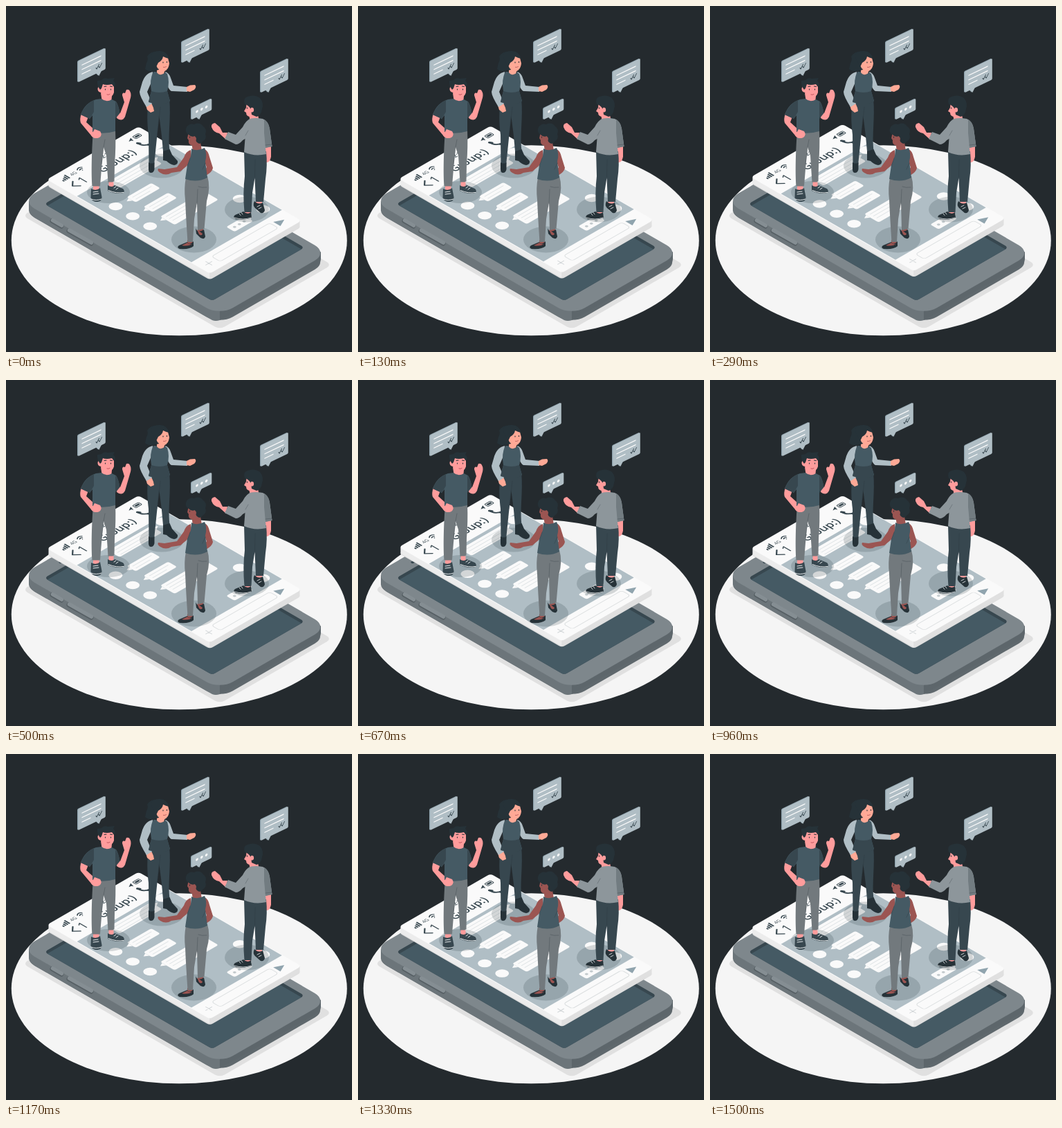
These frames come from a looping animation (500x500 px, 1.54 s). An HTML page:

```html
<!DOCTYPE html>
<html lang="en">
<head>
<meta charset="utf-8">
<title>Group chat</title>
<style>
html,body{margin:0;width:100%;height:100%;overflow:hidden;background:#242a2e}
svg{display:block;width:100vw;height:100vh}
text{font-family:"Open Sans",sans-serif;fill:#37474f}
.ink{fill:#263238}.deep{fill:#37474f}.slate{fill:#455a64}.grey{fill:#72797d}.mist{fill:#b0bec5}
.pink{fill:#ff9c9c}.peach{fill:#ffa996}.brown{fill:#9b5552}.white{fill:#fafafa}.shirt{fill:#8d969b}
.ln{fill:none;stroke-linecap:round;stroke-linejoin:round}
.fold{fill:none;stroke:#263238;stroke-opacity:.35;stroke-width:.8;stroke-linecap:round}
</style>
</head>
<body>
<svg viewBox="0 0 500 500">
<defs><clipPath id="glass"><rect x="12" y="22" width="154" height="280" rx="5"/></clipPath></defs>
<ellipse cx="250.300" cy="338.800" rx="242.500" ry="137.500" fill="#f5f5f5"/>

<g id="phone">
  <rect transform="matrix(.866 -.5 .866 .5 24 303)" width="187" height="329" rx="8" fill="#e0e0e0"/>
  <rect transform="matrix(.866 -.5 .866 .5 22 294.700)" width="181" height="331" rx="22" fill="#5f686d"/>
  <path d="M33 282V295Q34 300 41 305.700L298 454Q303 456 309 454V439Z" fill="#6c757a"/>
  <path d="M309 439V454L447 376Q455 371 455 366V355Z" fill="#5d666b"/>
  <rect transform="matrix(.866 -.5 .866 .5 22 281.700)" width="181" height="331" rx="22" fill="#7e878c"/>
  <g transform="matrix(.866 -.5 .866 .5 26 281)">
    <rect x="12" y="22" width="154" height="280" rx="5" fill="#37474f"/>
    <rect x="7" y="27" width="154" height="280" rx="5" class="slate" clip-path="url(#glass)"/>
    <rect x="46" y="11" width="36" height="4" rx="2" class="deep"/>
  </g>
  <path class="ln" d="M67 310.500L80 318M91 325L123 343" stroke="#565f64" stroke-width="7"/>
  <path class="ln" d="M67.500 309.700L80.500 317.200M91.500 324L123.500 342" stroke="#858e93" stroke-width="5.500"/>
</g>

<g id="sheet">
  <rect transform="matrix(.866 -.5 .866 .5 59 259.800)" width="153" height="272" rx="5" fill="#dfdfdf"/>
  <path d="M61.500 251V260L294.500 394V385Z" fill="#ececec"/>
  <path d="M294.500 385V394L424.500 319V310Z" fill="#e0e0e0"/>
  <rect transform="matrix(.866 -.5 .866 .5 59 250.800)" width="153" height="272" rx="5" class="white"/>
  <g transform="matrix(.866 -.5 .866 .5 61 250.800)" id="page">
    <rect y="48" width="151" height="191" fill="#b0bec5"/>
    <path class="deep" d="M10 16v-3h2v3zM13 16v-5h2v5zM16 16v-7h2v7zM19 16v-9h2v9z"/>
    <text x="25" y="15" font-size="7">4G</text>
    <path class="ln" d="M38 10.500q4-4 8 0M39.800 12.800q2.200-2 4.400 0M42 15v.1" stroke="#37474f" stroke-width="1.400"/>
    <text x="72" y="15.500" font-size="8" font-weight="600">12:30</text>
    <path class="deep" d="M122 12.500L129 8.500L127 15.500L125.700 13Z"/>
    <rect x="132" y="8.500" width="10" height="6" rx="1.500" fill="none" stroke="#37474f"/>
    <rect x="133.500" y="10" width="7" height="3" class="deep"/>
    <path class="ln" d="M18 23L11 29.500L18 36" stroke="#37474f" stroke-width="1.800"/>
    <text x="23" y="36" font-size="18">1</text>
    <text x="55" y="36" font-size="16" font-weight="600">Group:)</text>
    <path class="ln" d="M127 22q-1 9 10 12" stroke="#37474f" stroke-width="2.400"/>
    <path class="ln" d="M127 22l1.500 2.500M134 33.500l3 .5" stroke="#37474f" stroke-width="3.600"/>
    <g id="chat"></g>
    <path class="ln" d="M8 255h10M13 250v10" stroke="#d3d7d9" stroke-width="1.200"/>
    <rect x="25" y="247.500" width="97" height="14.500" rx="4" fill="#fafafa" stroke="#dcdfe0" stroke-width="1.100"/>
    <path d="M126.500 249L139 255L126.500 261Z" fill="#90a4ae"/>
  </g>
</g>

<g fill="#263238" fill-opacity=".18">
  <ellipse cx="148" cy="269" rx="31" ry="16"/><ellipse cx="225" cy="231" rx="32" ry="17.500"/>
  <ellipse cx="271.500" cy="337.500" rx="32.500" ry="19"/><ellipse cx="348" cy="294" rx="32" ry="18.500"/>
</g>

<g id="caller">
  <path class="peach" d="M218 86L218 99L227 101L230 92Z"/>
  <path class="deep" d="M207 134C203 152 204 170 206 186L206.500 230H214L218.500 186L221.500 160L225 188L227.500 215L237 212C233 190 239 160 236 134Z"/>
  <path class="fold" d="M221.500 160L223 146M218.500 186L221 160"/>
  <path class="ink" d="M206 226Q211 229 214.500 226L214.500 236Q213.500 241 209.500 241Q206 241 206 236Z"/>
  <path class="ink" d="M227 210L236.500 207L240 215L248 224Q249 229 243 230Q237 229 232 224L227 223Z"/>
  <path class="peach" d="M201 140L209 138L213 147L214 152L209 154L204 150Z"/>
  <path class="mist" d="M212 95C204 97 200 102 197 110L193 124Q193 130 203 146L211 141L204 124L211 108Z"/>
  <path class="mist" d="M230 95Q236 97 238 104L242 115L262 117V124L239 123Q235 121 232 112Z"/>
  <path class="peach" d="M261 117L266 114.500L273 114Q276 117 272 121L266 124L261 123Z"/>
  <path class="slate" d="M213 95L217 95Q223 103 230 96L233 98Q237 110 233 123L237 137Q222 145 206 138L210 123Q207 106 213 95Z" fill="#3f525b"/>
  <path class="deep" d="M210 123Q222 127 233 123L237 138Q222 145 206 139Z"/>
  <path class="ink" d="M222 66Q209 64 204 73Q206 77 203 82L201 91Q207 97 221 92L226 76Z"/>
  <path class="peach" d="M218 75Q229 64 234 75L236 83Q235 92 229 94Q220 94 217 86Z"/>
  <path class="ink" d="M235 76Q234 66 223 65Q212 64 209 72L217 88L220 82Q226 79 227 73Q231 75 235 76Z"/>
  <path class="ln" d="M227 81v1M232.500 80.500v1" stroke="#263238" stroke-width="1.200"/>
  <path class="ln" d="M227.500 88.500q2.500.5 4-.8" stroke="#b85c5c" stroke-width=".9"/>
</g>

<g id="waver">
  <path class="grey" d="M126 180L158 179Q159 205 157 228L156.500 253Q152 257 147.500 255L145 216L141 204L138 235L136 260Q130 263 124.500 260C123 240 124 205 126 180Z"/>
  <path class="fold" d="M141 204L143 193M138 228L141 205"/>
  <path class="pink" d="M126 260.500h8.500v7h-8.500zM148.500 254.500h7v8h-7z"/>
  <path class="deep" d="M123 264Q130 268 136 263L138.500 276Q139 282 132 283Q124 283 122.500 277Z"/>
  <path class="deep" d="M147 259Q153 263 157 259L169 264Q172 267 170 270Q164 272 155 270L147 267Z"/>
  <path class="ln" d="M123 279Q130 282 138 279M148 266.500Q160 271.500 170 269.500M126 269l7-1M126 272l8-1M156 263l3-2M159 265l3-2" stroke="#e8ecee" stroke-width="1"/>
  <path class="pink" d="M109 155L119 160L116 168L127 178L136 182Q139 187 135 190Q128 193 123 187L108 169Q106 164 109 155Z"/>
  <path class="pink" d="M160 151L165 155L171 139L168 129Q168 124 172 126L174 121Q178 120 179 123Q182 128 179 136L172 160Q168 168 160 162Z"/>
  <path class="pink" d="M137 126L139 139L152 140L153 130Z"/>
  <path class="slate" d="M130 135L138 134Q145 140 153 135L159 138Q163 144 164 154L158 162L158 181Q141 186 125 182L125 158L121 163L108 157Q114 140 130 135Z"/>
  <path class="deep" d="M127 136Q115 141 108 157L121 163L127 153ZM158 138Q163 144 164.500 155L158 163Z"/>
  <path class="pink" d="M128 178L136 181Q140 187 134 190Q127 193 123 187Z"/>
  <path class="pink" d="M136 112Q145 106 156 112L156 125Q154 132 147 133Q139 132 137 125Q132 124 132.500 119Z"/>
  <path class="ink" d="M136 121Q131 115 132 108L138 107Q141 103 147 105L157 104L155 108Q160 112 156 117L153 113Q145 115 140 113L138 119Z"/>
  <path class="ln" d="M143.500 120v1M151.500 120v1M142 116.500l3-.5M150.500 116l3 .5" stroke="#263238" stroke-width="1.100"/>
  <path class="ln" d="M146 128q2 1 4-.5" stroke="#b84f58" stroke-width=".9"/>
</g>

<g id="guest">
  <path class="pink" d="M375 202L383 202L383 218Q381 227 376 226L374 218Z"/>
  <path class="pink" d="M345 296h9v6h-9zM361 280h9v7h-9z"/>
  <path class="deep" d="M344 209L376 210Q378 230 375 250L372 283H361L359.500 248L356 270L354.500 298H344.500Q342 270 345 246Z"/>
  <path class="fold" d="M359.500 250L360 222"/>
  <path class="ink" d="M343 297Q349 302 354 298L355 306Q346 310 332 308Q327 305 331 302Z"/>
  <path class="ink" d="M359 282Q365 288 371 284L374 295Q373 300 368 299L360 292Q356 288 359 282Z"/>
  <path class="ln" d="M330 306Q343 310 354 306M337 300l2 2.500M340 298.500l2 2.500M363 290l4-2M365 293l4-2" stroke="#dfe4e6" stroke-width=".9"/>
  <path class="pink" d="M320 183L313 183L309 175L302 169Q296 170 297 175Q300 183 308 184L318 193Z"/>
  <path class="shirt" d="M353 163Q347 165 342 175L332 186L321 182L316 192L332 200Q337 200 342 194L352 188Z" fill="#838d92"/>
  <path class="pink" d="M351 156L353 168L366 168L364 157Z"/>
  <path class="shirt" d="M352 163Q360 161 371 163Q379 166 381 177L384.500 203L375 205L376 214Q359 218 344 211L346 185Q346 170 352 163Z"/>
  <path d="M373 164Q379 167 381 177L384.500 203L375 205L373 183Z" fill="#727c81"/>
  <path class="fold" d="M346 187L350 180M375 201L384 200"/>
  <path class="pink" d="M348 137Q360 133 363 147Q362 159 354 160Q347 160 347 154L344 152L347 147Z"/>
  <path class="ink" d="M345 142Q342 133 349 131Q359 127 367 133Q373 140 370 149Q369 158 362 160L355 157L354 149Q350 143 345 142Z"/>
  <path class="pink" d="M354 147q5-1 4 5q-3 3-5 0z"/>
  <path class="ln" d="M348.500 147v1" stroke="#263238" stroke-width="1.200"/>
</g>

<g id="friend">
  <path class="brown" d="M262 338h8v7h-8zM277 318h8v8h-8z"/>
  <path class="grey" d="M260 248L291 246Q296 262 290 282L286.500 322L277 324L276 284L272 308L270 341H262.500Q260 305 259 280Q257 263 260 248Z"/>
  <path class="fold" d="M276 286L277 265M290 262Q283 263 278 261"/>
  <path class="ink" d="M262 341Q264 347 271 340V347Q266 352 251 351Q246 349 250 346Z"/>
  <path class="ink" d="M274 321Q277 329 286 323L288 333Q287 338 281 335L275 329Z"/>
  <path class="brown" d="M254 346l8-4q3 4 8 1q-6 5-16 3zM276 323l8 6q-1 4-5 1z"/>
  <path class="brown" d="M267 208Q260 210 257 219L247 233L229 236L220 235Q218 238 223 241Q231 246 239 241L252 239Q260 233 268 224Z"/>
  <path class="brown" d="M287 207Q292 209 294 218L299 234Q298 240 289 245L285 241L290 233L285 221Z"/>
  <path class="brown" d="M268 196L270 210L283 209L281 197Z"/>
  <path class="slate" d="M268 206Q276 211 287 205Q291 213 288 225L291 248Q276 256 259 250L262 230L267 217Z"/>
  <path class="fold" d="M262 232L266 220M288 227L284 236"/>
  <path class="brown" d="M264 182L277 182L279 199Q274 204 267 201Q263 199 264 194L262 191Z"/>
  <path class="ink" d="M264 186Q257 182 261 175Q265 169 272 171Q280 167 285 174Q291 178 288 185Q291 192 284 196Q280 202 275 196L273 188Q268 190 264 186Z"/>
  <path class="brown" d="M271 189q4-1 4 4q-3 3-5 0z"/>
  <path class="ln" d="M265.500 189v1" stroke="#263238" stroke-width="1.100"/>
</g>
<g id="air"></g>
</svg>
<script>
const $ = id => document.getElementById(id);
const line = (x, y, w, c, s) =>
  `<path class="ln" d="M${x} ${y}h${w}" stroke="${c}" stroke-width="${s}"/>`;
const dots = (x, y, gap, r, c) =>
  [0, 1, 2].map(i => `<circle cx="${x + i * gap}" cy="${y}" r="${r}" fill="${c}"/>`).join('');
const avatar = (x, y) => `<circle cx="${x}" cy="${y}" r="8.100" class="white"/>`;

// side: -1 puts the tail on the left, 1 on the right
function message(x, y, w, h, side, rows) {
  const tx = side < 0 ? x : x + w;
  let s = `<rect x="${x}" y="${y}" width="${w}" height="${h}" rx="3" class="white"/>` +
    `<path class="white" d="M${tx} ${y + 3}L${tx + side * 6} ${y + 6}L${tx} ${y + 10}Z"/>`;
  for (let i = 0; i < rows; i++)
    s += line(x + 5, y + 5 + i * 5.5, (w - 10) * (i && i === rows - 1 ? 0.75 : 1), '#dde2e4', 1);
  return s;
}

$('chat').innerHTML =
  message(47, 53, 71, 19, 1, 3) + avatar(134, 56) +
  message(40, 91, 41, 15, -1, 2) + avatar(17.500, 95) +
  message(40, 119, 41, 15, -1, 2) + avatar(17.500, 123.500) +
  message(40, 147, 73, 24, -1, 3) + avatar(17.500, 152.500) +
  avatar(132, 187.500) + avatar(136.500, 222) +
  message(80, 217, 31, 14, 1, 0) + dots(87, 224, 8, 2, '#c3cacd');

function balloon(x, y, w, h, tail, typing) {
  const shape = `<rect width="${w}" height="${h}" rx="1.500"/>` +
    `<path d="M${tail - 4} ${h - 1}L${tail} ${h + 5}L${tail + 4} ${h - 1}Z"/>`;
  const check = d => `M${27 + d} 23l1.300 2l3.200-5`;
  const body = typing ? dots(9, h / 2 + 1, 6.800, 1.8, '#fafafa') :
    line(7, 9, 27, '#fafafa', 1.4) + line(7, 15.500, 27, '#fafafa', 1.4) +
    line(7, 22, 12, '#fafafa', 1.4) +
    `<path class="ln" d="${check(0)}${check(4)}" stroke="#37474f" stroke-width="1"/>`;
  return `<g transform="matrix(1 -.48 0 1 ${x} ${y})">` +
    `<g fill="#90a4ae">${shape}</g><g class="mist" transform="translate(1.300 .9)">${shape}</g>${body}</g>`;
}

$('air').innerHTML =
  balloon(103, 79.500, 39.500, 30.500, 30) +
  balloon(253, 51.500, 39.500, 30.500, 11) +
  balloon(367, 94.500, 39.500, 30.500, 11) +
  balloon(267, 147.500, 29, 16.500, 11, true);

const LOOP = 1540, LEAD = 30, RISE = 9.4;
function draw(ms) {
  const turn = 2 * Math.PI * (ms + LEAD) / LOOP;
  const y = -RISE * (1 - Math.cos(turn)) / 2;
  $('sheet').setAttribute('transform', `translate(0 ${y.toFixed(3)})`);
}
const start = performance.now();
function tick() {
  draw((performance.now() - start) % LOOP);
  requestAnimationFrame(tick);
}
draw(0);
requestAnimationFrame(tick);
</script>
</body>
</html>
```
